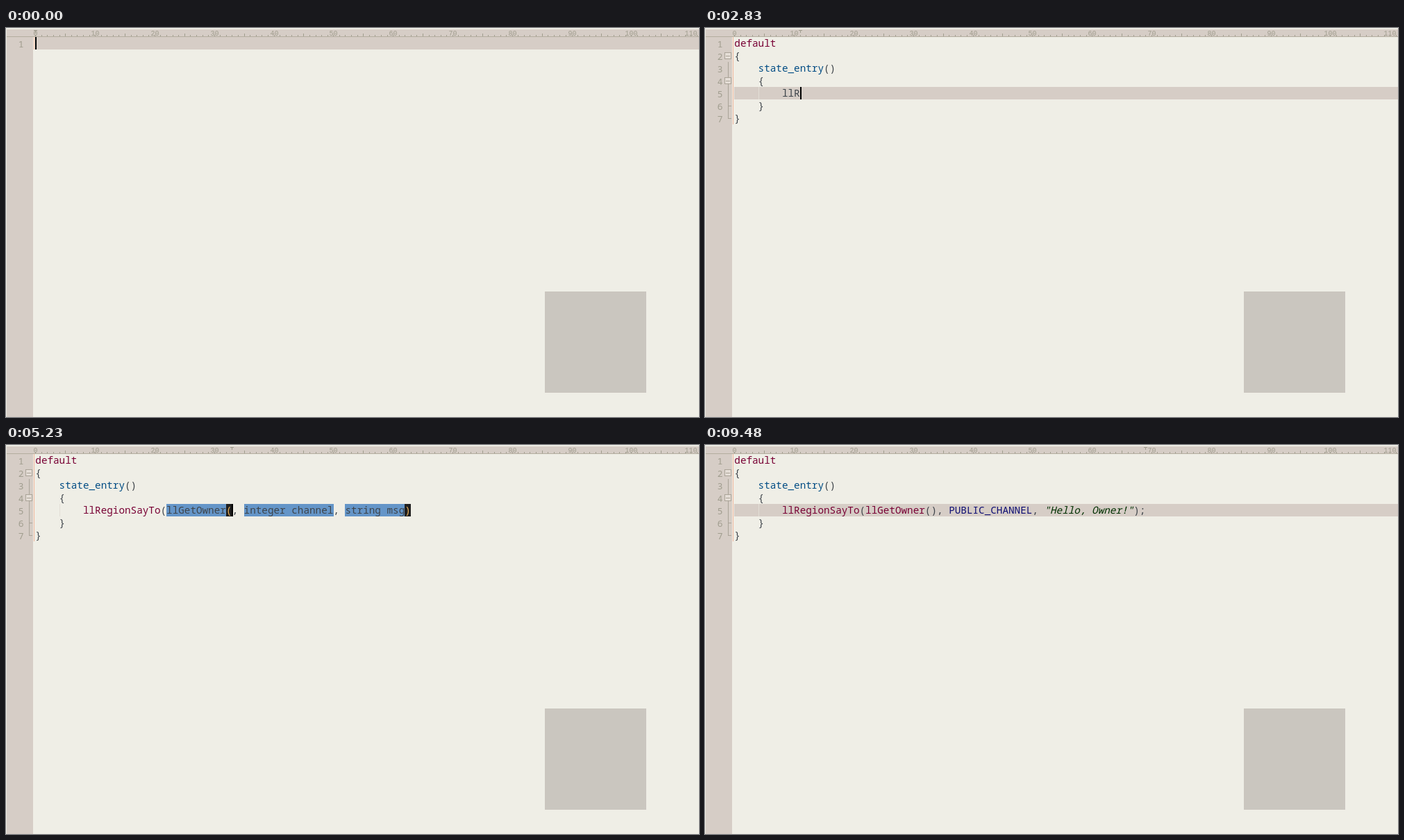
Recreate the animation shown at these times as an HTML page with a canvas. Size 998 px wide and 561 px high, loop 9640 ms.

```html
<!DOCTYPE html>
<html lang="en">
<head>
<meta charset="utf-8">
<title>Code editor</title>
<style>
html, body { margin: 0; width: 100%; height: 100%; overflow: hidden; background: #efeee6 }
canvas { display: block }
</style>
</head>
<body>
<canvas id="stage" width="998" height="561"></canvas>
<script>
const ctx = document.getElementById('stage').getContext('2d');
const LOOP = 9640, LEFT = 42.3, CHAR = 8.58, TOP = 13, ROW = 18;
const MONO = '"Noto Sans Mono", "DejaVu Sans Mono", monospace';
const PAPER = '#efeee6', SHADE = '#d6cdc6', DIM = '#a09d8e', INK = '#3e444a';
const GREEN = '#003000', BLUE = '#6495c8';
const RULES = [
  [/\b(default|llRegionSayTo|llGetOwner)\b/g, '#780034'],
  [/\bstate_entry\b/g, '#004c84'],
  [/\bPUBLIC_CHANNEL\b/g, '#101074']
];
const colX = col => LEFT + col * CHAR;
const rowY = row => TOP + row * ROW;

// Completion lists: the first `icons` entries carry a snippet icon
const LISTS = {
  def: { icons: 1, items: ['default', 'default', 'DEBUG_CHANNEL', 'DENSITY', 'detach', 'do', 'else', 'email'] },
  sta: { icons: 3, items: ['state', 'state_entry', 'state_exit', 'state', 'state_entry', 'state_exit',
    'STATUS_BLOCK_GRAB', 'STATUS_BLOCK_GRAB_OBJECT'] },
  llRe: { icons: 8, items: ['llRegionSay', 'llRegionSayTo', 'llReleaseCamera', 'llReleaseControls', 'llReleaseURL',
    'llRemoteDataReply', 'llRemoteLoadScriptPin', 'llRemoveInventory'] }
};

// Timeline: each step patches the state before it
const steps = [];
let state = { lines: [''], caret: [0, 0], blink: true };
function at(time, patch) {
  state = { ...state, match: [], marked: null, blink: true, ...patch };
  steps.push([time, state]);
}
function type(start, gap, row, indent, text) {
  for (let n = 1; n <= text.length; n++) {
    const lines = [...state.lines];
    lines[row] = ' '.repeat(indent) + text.slice(0, n);
    at(start + (n - 1) * gap, { lines, caret: [row, indent + n] });
  }
}
const CALL = '        llRegionSayTo(';
function setField(time, fields, active, whole, patch) {
  const lines = [...state.lines];
  lines[4] = CALL + fields.join(', ') + ')';
  const col = CALL.length + fields.slice(0, active + 1).join(', ').length;
  at(time, { lines, fields, active, whole, caret: [4, col], popup: null, ...patch });
}
function fill(start, gap, active, text, from = 1) {
  for (let n = from; n <= text.length; n++) {
    const fields = [...state.fields];
    fields[active] = text.slice(0, n);
    setField(start + (n - from) * gap, fields, active, false);
  }
}

at(0, {});
type(160, 160, 0, 0, 'def');
at(560, { popup: { list: 'def', pick: 0, row: 1, col: 3 } });
const outer = ['default', '{', '', '}'];
at(1000, {
  lines: ['', '{', '    ^', '}'], caret: [3, 1], marked: [0, 3], blink: false, match: [[1, 0], [3, 0]],
  popup: { row: 1, col: 3, blank: true }
});
at(1030, { lines: outer, caret: [2, 4], popup: null });
at(1190, { folds: true });
type(1320, 160, 2, 4, 'sta');
at(1800, { popup: { list: 'sta', pick: 0, row: 3, col: 7 } });
at(1960, { popup: { list: 'sta', pick: 1, row: 3, col: 7 } });
const inner = ['default', '{', '    state_entry()', '    {', '', '    }', '}'];
at(2090, { lines: inner, caret: [5, 5], popup: null, folds: false, match: [[3, 4], [5, 4]] });
at(2120, { caret: [4, 8], folds: true });
type(2440, 160, 4, 8, 'llRe');
at(3080, { popup: { list: 'llRe', pick: 0, row: 5, col: 12 } });
at(3300, { popup: { list: 'llRe', pick: 1, row: 5, col: 12 } });
setField(3490, ['key target', 'integer channel', 'string msg'], 0, true);
fill(3650, 158, 0, 'llGetOwner');
const rest = ['integer channel', 'string msg'];
setField(5230, ['llGetOwner(', ...rest], 0, false, { match: [[4, 32], [4, 62]] });
setField(5390, ['llGetOwner()', ...rest], 0, false, { match: [[4, 32], [4, 33]] });
setField(5670, ['llGetOwner()', ...rest], 1, true);
fill(5870, 77.6, 1, 'PUBLIC_CHANNEL');
setField(7040, state.fields, 2, true);
fill(7200, 80, 2, '"Hello, ');
state.blink = false;
fill(7890, 150, 2, '"Hello, Owner!"', 9);
at(9000, { fields: null, caret: [4, 68], match: [[4, 21], [4, 67]] });
const done = [...state.lines];
done[4] += ';';
at(9160, { lines: done, caret: [4, 69] });
at(9480, { blink: false });

function rect(color, x, y, w, h) {
  ctx.fillStyle = color;
  ctx.fillRect(x, y, w, h);
}
function label(text, x, y, font, color, align = 'left') {
  ctx.font = font;
  ctx.fillStyle = color;
  ctx.textAlign = align;
  ctx.fillText(text, x, y);
}
function triangle(x, y, dir) {
  ctx.fillStyle = '#444';
  ctx.beginPath();
  ctx.moveTo(x - 4, y + 2 * dir);
  ctx.lineTo(x + 4, y + 2 * dir);
  ctx.lineTo(x, y - 2 * dir);
  ctx.fill();
}

function drawRuler(col) {
  rect(SHADE, 1, 2, 997, 11);
  for (let n = 0; n <= 111; n++) {
    const x = Math.round(colX(n)), tall = n % 5 || n % 10 === 0 ? 3 : 5;
    rect(DIM, x, 13 - tall, 1, tall);
    if (n % 10 === 0) label(n, x + .5, 10.5, '10px "Liberation Mono", monospace', DIM, 'center');
  }
  rect('#b3ad9f', 1, 12, 997, 1);
  const x = Math.round(colX(col));
  rect(DIM, x - 2, 3, 5, 1);
  rect(DIM, x, 3, 1, 4);
}

function drawFolds(count) {
  const color = '#aaa397', last = rowY(count - 1) + 9;
  rect(color, 33, 49, 1, last - 48);
  rect(color, 33, last, 5, 1);
  if (count > 4) rect(color, 33, last - ROW, 5, 1);
  for (const row of count > 4 ? [1, 3] : [1]) {
    const y = rowY(row) + 5;
    rect(color, 28, y - 1, 10, 10);
    rect('#e4ddd6', 29, y, 8, 8);
    rect(color, 30, y + 4, 6, 1);
  }
}

function drawPopup({ list, pick, row, col, blank }) {
  const x = Math.round(colX(col)), y = rowY(row);
  rect('#828282', x, y, 203, 129);
  rect('#fff', x, y, 201, 127);
  if (blank) return;
  const { icons, items } = LISTS[list];
  items.forEach((item, n) => {
    const top = y + 1.5 + n * 15.57, mid = top + 7.8;
    if (n === pick) rect('#2a91f7', x + 2, Math.round(top), 182, 16);
    if (n < icons) {
      const iy = Math.round(mid) - 5;
      rect('#2c9c38', x + 5, iy, 8, 8);
      rect('#fff', x + 7, iy + 2, 4, 1);
      rect('#fff', x + 8.5, iy + 2, 1, 4);
    }
    label(item, x + (n < icons ? 17.5 : 2.5), mid + 3.4, '9.8px "Noto Sans", sans-serif', n === pick ? '#fff' : '#000');
  });
  rect('#f0f0f0', x + 185, y + 1, 15, 126);
  rect('#999', x + 185, y + 19, 15, 29);
  rect('#e6e6e6', x + 186, y + 20, 13, 27);
  for (let n = 0; n < 4; n++) rect('#666', x + 189, y + 29 + n * 2.5, 7, 1);
  triangle(x + 192, y + 10, 1);
  triangle(x + 192, y + 118, -1);
}

function drawText(s) {
  let open = false;
  s.lines.forEach((line, row) => {
    const colors = Array(line.length).fill(INK), slanted = [];
    for (const [rule, color] of RULES)
      for (const hit of line.matchAll(rule)) colors.fill(color, hit.index, hit.index + hit[0].length);
    for (let col = 0; col < line.length; col++) {
      const quote = line[col] === '"';
      if (open || quote) {
        colors[col] = GREEN;
        slanted[col] = true;
      }
      if (quote) open = !open;
    }
    if (row === 4 && s.fields) {
      let start = CALL.length;
      s.fields.forEach((field, n) => {
        const end = start + field.length;
        rect(BLUE, Math.round(colX(start)), rowY(row), Math.round(field.length * CHAR), ROW);
        colors.fill(s.whole && n === s.active ? '#fff' : INK, start, end);
        slanted.fill(false, start, end);
        start = end + 2;
      });
    }
    for (const [r, col] of s.match) if (r === row) {
      rect('#202020', Math.round(colX(col)), rowY(row), 9, ROW);
      colors[col] = '#f0b45a';
    }
    [...line].forEach((ch, col) =>
      label(ch, colX(col), rowY(row) + 14, (slanted[col] ? 'italic ' : '') + '14.3px ' + MONO, colors[col]));
  });
  return open;
}

function draw(s) {
  const count = s.lines.length, [row, col] = s.caret;
  rect(PAPER, 0, 0, 998, 561);
  rect('#cac6bf', 776, 380, 146, 146);
  rect(SHADE, 1, 2, 38, 559);
  if (s.popup?.blank) {
    drawPopup(s.popup);
    rect(PAPER, 42, TOP, 956, count * ROW);
  }
  if (!s.fields) for (const r of s.marked || [row]) rect(SHADE, 42, rowY(r), 956, ROW);
  rect('#efb79d', 40, TOP, 1, count * ROW);
  for (let n = 0; n < count; n++) label(n + 1, 25.5, rowY(n) + 14.5, '13px ' + MONO, DIM, 'right');
  if (count > 4) rect('#e2dfd6', 77, rowY(4), 1, ROW);
  const open = drawText(s);
  if (s.folds && !open) drawFolds(count);
  if (s.blink) rect('#000', Math.round(colX(col)), rowY(row), 2, ROW);
  if (s.popup && !s.popup.blank) drawPopup(s.popup);
  drawRuler(col);
}

const begin = performance.now();
function tick() {
  const time = (performance.now() - begin) % LOOP;
  draw(steps.findLast(([start]) => start <= time)[1]);
  requestAnimationFrame(tick);
}
tick();
</script>
</body>
</html>
```
